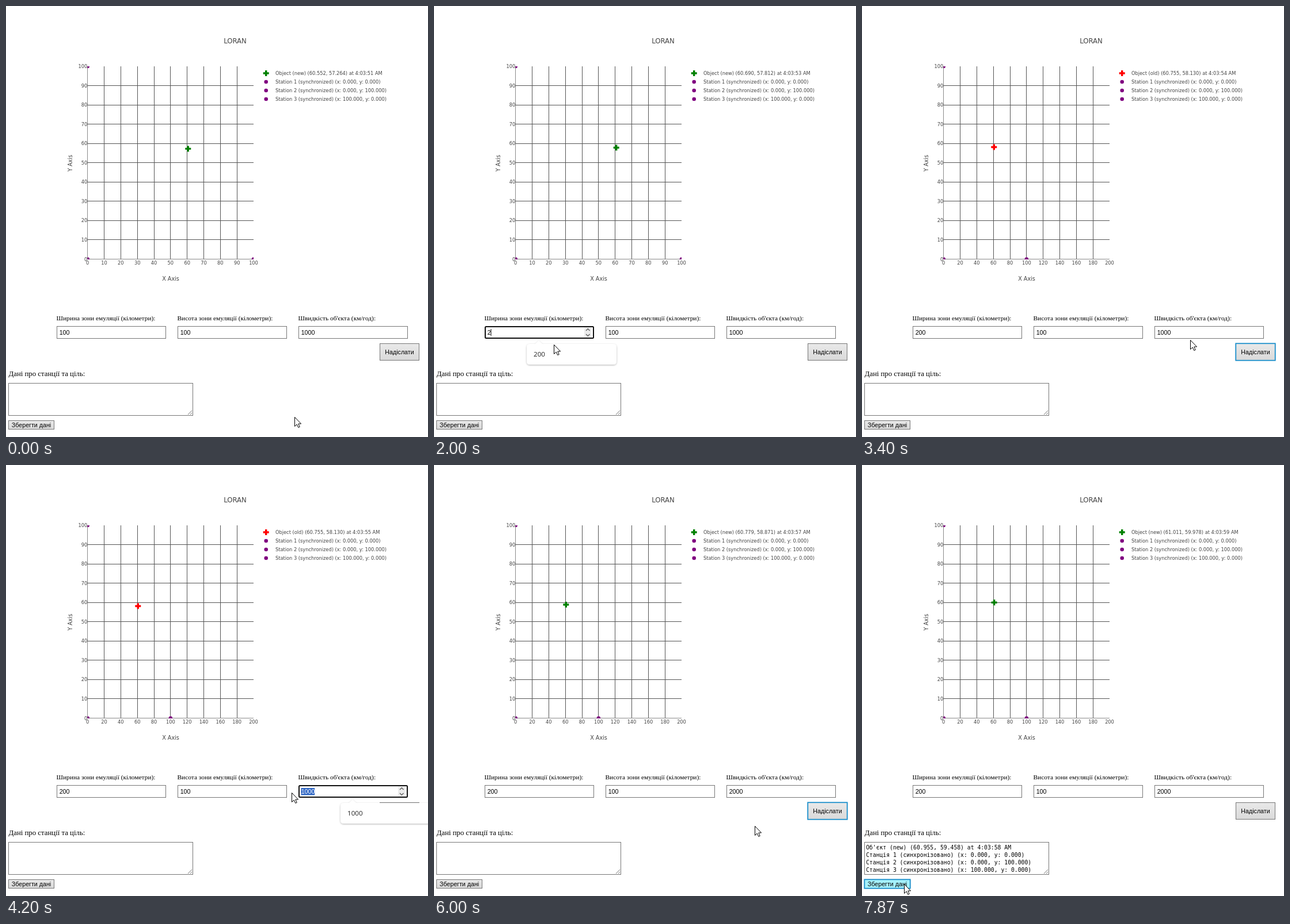
These frames come from a looping animation (733x750 px, 8000 ms). An HTML page:

```html
<!DOCTYPE html>
<html lang="uk">
<head>
<meta charset="utf-8">
<title>LORAN</title>
<style>
html, body { margin: 0; width: 100%; height: 100%; overflow: hidden; background: #fff; }
svg { display: block; width: 100%; height: 100%; }
text { white-space: pre; }
.plot { font: 8.25px "DejaVu Sans", Verdana, sans-serif; fill: #444; }
.title { font-size: 11.69px; }
.axis { font-size: 9.63px; }
.label { font: 11.4px "Liberation Serif", "Times New Roman", serif; }
.big { font-size: 12.8px; }
.ui { font: 10.67px "Liberation Sans", Arial, sans-serif; }
.mono { font: 9.74px "DejaVu Sans Mono", monospace; }
.item { font: 11.6px "Open Sans", "Noto Sans", sans-serif; fill: #222; }
.mid { text-anchor: middle; }
.end { text-anchor: end; }
.box { fill: #fff; stroke: #767676; }
.station { fill: #800080; }
.chev { fill: none; stroke: #666; stroke-width: 1.5; }
</style>
</head>
<body>
<svg id="stage" viewBox="0 0 733 750">
  <defs>
    <clipPath id="area"><rect x="141.5" y="105" width="288.5" height="336"/></clipPath>
    <linearGradient id="face" x2="0" y2="1">
      <stop stop-color="#e9e9e9"/><stop offset="1" stop-color="#d9d9d9"/>
    </linearGradient>
    <filter id="shadow" x="-10%" y="-20%" width="120%" height="150%">
      <feDropShadow dx="0" dy="1" stdDeviation="1.6" flood-opacity=".3"/>
    </filter>
  </defs>
</svg>
<script>
const LOOP = 8000;
const stage = document.getElementById('stage');

function add(parent, tag, attrs = {}, text) {
  const el = document.createElementNS('http://www.w3.org/2000/svg', tag);
  for (const k in attrs) el.setAttribute(k, attrs[k]);
  if (text !== undefined) el.textContent = text;
  parent.appendChild(el);
  return el;
}
const label = (parent, cls, x, y, text) => add(parent, 'text', { class: cls, x, y }, text);
const set = (el, attrs) => { for (const k in attrs) el.setAttribute(k, attrs[k]); };
const show = (el, on) => { el.style.display = on ? '' : 'none'; };
const write = (el, s) => { if (el.textContent !== s) el.textContent = s; };

// ---- chart ----
const CROSS = 'M-5-1.7H-1.7V-5H1.7V-1.7H5V1.7H1.7V5H-1.7V1.7H-5Z';
const px = v => 141.7 + v * 288.3;
const py = v => 440.5 - v * 3.355;
const chart = add(stage, 'g');
label(chart, 'plot title mid', 398, 65, 'LORAN');
label(chart, 'plot axis mid', 286, 478, 'X Axis');
add(chart, 'text', { class: 'plot axis mid', transform: 'translate(115.3 273.5) rotate(-90)' }, 'Y Axis');

const xTicks = [];
for (let k = 0; k <= 10; k++) {
  const x = Math.floor(px(k / 10)) + .5, y = Math.floor(py(k * 10)) + .5;
  const stroke = k ? '#555' : '#8a8a8a';
  if (k < 10) {
    add(chart, 'path', { d: `M${x} 105V440`, stroke });
    add(chart, 'path', { d: `M142 ${y}H430`, stroke });
  }
  label(chart, 'plot end', 141.3, py(k * 10) + 3, k * 10);
  xTicks.push(label(chart, 'plot mid', px(k / 10), 450, ''));
}
const area = add(chart, 'g', { 'clip-path': 'url(#area)' });
const dot = (parent, cx, cy) => add(parent, 'circle', { class: 'station', cx, cy, r: 3.3 });
dot(area, px(0), py(0));
dot(area, px(0), py(100));
const farDot = dot(area, px(1), py(0));
const target = add(area, 'path', { d: CROSS });

const keyMark = add(chart, 'path', { d: CROSS, transform: 'translate(451.7 117)' });
const keyText = label(chart, 'plot', 468, 120, '');
['x: 0.000, y: 0.000', 'x: 0.000, y: 100.000', 'x: 100.000, y: 0.000'].forEach((s, i) => {
  dot(chart, 451.7, 132 + 15 * i);
  label(chart, 'plot', 468, 135 + 15 * i, `Station ${i + 1} (synchronized) (${s})`);
});

// ---- form ----
function field(x, caption) {
  const g = add(stage, 'g');
  label(g, 'label', x - .5, 547, caption);
  const rect = add(g, 'rect', { class: 'box' });
  const spin = add(g, 'g');
  add(spin, 'rect', { x: x + 173, y: 559.5, width: 12.5, height: 17, fill: '#ececec' });
  add(spin, 'path', { class: 'chev', d: `M${x + 176} 565l3.3-3.3 3.3 3.3M${x + 176} 571l3.3 3.3 3.3-3.3` });
  const mark = add(g, 'rect', { x: x + 4.5, y: 562, height: 12.5, fill: '#2f66c4' });
  const text = label(g, 'ui', x + 4.7, 572, '');
  const caret = add(g, 'rect', { y: 562, width: 1, height: 12 });
  return (value, focus, selected, caretOn) => {
    const w = value.length * 5.93;
    const o = focus ? 1 : .5;
    set(rect, { x: x + o, y: 557 + o, width: 190 - 2 * o, height: 22 - 2 * o, rx: focus ? 1.5 : 0 });
    rect.style.stroke = focus ? '#101010' : '';
    rect.style.strokeWidth = focus ? 2 : 1;
    show(spin, focus);
    show(mark, selected);
    show(caret, caretOn);
    set(mark, { width: w });
    set(caret, { x: Math.round(x + 4.7 + w) - .5 });
    set(text, { fill: selected ? '#fff' : '#000' });
    write(text, value);
  };
}
const width = field(88, 'Ширина зони емуляції (кілометри):');
const height = field(298, 'Висота зони емуляції (кілометри):');
const speed = field(508, "Швидкість об'єкта (км/год):");

function button(x, y, w, h, base, caption) {
  const g = add(stage, 'g');
  const rect = add(g, 'rect');
  label(g, 'ui mid', x + w / 2, base, caption);
  return (hover, focus) => {
    const o = focus ? .25 : .5;
    set(rect, {
      x: x + o, y: y + o, width: w - 2 * o, height: h - 2 * o,
      fill: hover ? '#a5f1fb' : 'url(#face)',
      stroke: focus ? '#1b8fcb' : '#767676', 'stroke-width': focus ? 1.8 : 1
    });
  };
}
const send = button(649, 587, 69, 30, 606, 'Надіслати');

label(stage, 'label big', 4.5, 644, 'Дані про станції та ціль:');
add(stage, 'rect', { class: 'box', x: 4.5, y: 656.5, width: 320, height: 56 });
add(stage, 'path', { d: 'M316 711l7-7M320 711l3-3', stroke: '#777' });
const output = add(stage, 'g');
["Об'єкт (new) (60.955, 59.458) at 4:03:58 AM",
 'Станція 1 (синхронізовано) (x: 0.000, y: 0.000)',
 'Станція 2 (синхронізовано) (x: 0.000, y: 100.000)',
 'Станція 3 (синхронізовано) (x: 100.000, y: 0.000)'
].forEach((s, i) => label(output, 'mono', 7, 669 + 13 * i, s));
const save = button(4, 721, 80, 16, 733, 'Зберегти дані');

// ---- suggestion list ----
function popup(x, items) {
  const g = add(stage, 'g');
  const h = 36 * items.length;
  add(g, 'path', {
    d: `M${x + 6} 588H${x + 15}L${x + 21} 582.5L${x + 27} 588H${x + 150}q6 0 6 6V${582 + h}q0 6-6 6H${x + 6}q-6 0-6-6V594q0-6 6-6Z`,
    fill: '#fff', filter: 'url(#shadow)'
  });
  items.forEach((s, i) => label(g, 'item', x + 12, 610 + 36 * i, s));
  const close = add(g, 'path', { d: `M${x + 134} 602l8 8m0-8l-8 8`, stroke: '#333', 'stroke-width': 1.5 });
  return (t, from, to, fade, hover) => {
    show(g, t >= from && t < to + fade);
    const out = fade ? Math.min(1, Math.max(0, (t - to) / fade)) : 0;
    const s = 1 - .05 * out, cx = x + 78, cy = 588 + h / 2;
    set(g, { opacity: 1 - out, transform: `translate(${cx} ${cy}) scale(${s}) translate(${-cx} ${-cy})` });
    show(close, hover);
  };
}
const listAll = popup(161, ['100', '1000']);
const listWidth = popup(161, ['200']);
const listOld = popup(581, ['1000']);
const listSpeed = popup(581, ['2000']);

// ---- pointer ----
const pointer = add(stage, 'path', {
  d: 'M.5.5V16.5L4.2 13L6.8 18.5L9.2 17.4L6.8 12H11.6Z', fill: '#fff', stroke: '#000', 'stroke-width': 1
});
const path = [
  [70, 501, 715], [730, 142, 568], [870, 142, 568], [1230, 54, 572], [1730, 54, 572],
  [2440, 526, 625], [2600, 526, 625], [2930, 676, 602], [3070, 676, 602], [3400, 570, 581],
  [3700, 545, 568], [3930, 545, 568], [4130, 496, 570], [4260, 496, 570], [4770, 664, 610],
  [4930, 664, 610], [5450, 680, 599], [5850, 680, 599], [6000, 557, 628], [6670, 60, 723],
  [7000, 66, 727], [7470, 74, 729], [7840, 74, 729], [7870, 73, 729]
];
function pointerAt(t) {
  const i = path.findIndex(p => p[0] > t);
  if (i === 0) return path[0].slice(1);
  if (i < 0) return path[path.length - 1].slice(1);
  const [t0, x0, y0] = path[i - 1], [t1, x1, y1] = path[i];
  const u = (t - t0) / (t1 - t0), e = u * u * (3 - 2 * u);
  return [x0 + (x1 - x0) * e, y0 + (y1 - y0) * e];
}

// ---- state over time ----
const fixes = [
  [60.552, 57.264], [60.632, 57.496], [60.69, 57.812], [60.755, 58.13], [60.755, 58.13],
  [60.811, 58.647], [60.779, 58.871], [60.955, 59.458], [61.011, 59.978]
];
const widthKeys = [[0, '100'], [1870, '2'], [2100, '20'], [2330, '200']];
const speedKeys = [[0, '1000'], [4270, '2'], [4470, '20'], [4670, '200'], [4960, '2000']];
const lastKey = (keys, t) => keys.filter(k => k[0] <= t).pop();
const within = (t, a, b) => t >= a && t < b;

function typed(draw, keys, t, from, to) {
  const [at, value] = lastKey(keys, t);
  const focus = within(t, from, to);
  const selected = focus && at === 0;
  draw(value, focus, selected, focus && !selected && (t - at) % 1000 < 500);
}

function render(t) {
  const n = Math.min(8, Math.floor((t + 610) / 1000));
  const [x, y] = fixes[n];
  const old = n === 4, range = n >= 4 ? 200 : 100;
  const color = old ? '#f00' : '#008000';
  const sec = 51 + Math.floor((t + 270) / 1000);
  set(target, { transform: `translate(${px(x / range)} ${py(y)})`, fill: color });
  set(keyMark, { fill: color });
  set(farDot, { cx: px(100 / range) });
  write(keyText, `Object (${old ? 'old' : 'new'}) (${x.toFixed(3)}, ${y.toFixed(3)}) at 4:03:${sec} AM`);
  xTicks.forEach((el, k) => write(el, String(k * range / 10)));

  typed(width, widthKeys, t, 900, 3060);
  height('100', false, false, false);
  typed(speed, speedKeys, t, 3930, 5660);

  listAll(t, 930, 1870, 0, false);
  listWidth(t, 1870, 2400, 100, false);
  listOld(t, 3960, 4270, 0, false);
  listSpeed(t, 4270, 4980, 100, t > 4560);

  const [mx, my] = pointerAt(t);
  const over = (x0, y0, w, h) => mx >= x0 && mx < x0 + w && my >= y0 && my < y0 + h;
  send(over(649, 587, 69, 30) && !within(t, 3930, 5080), within(t, 3060, 3930) || within(t, 5660, 7000));
  save(over(4, 721, 80, 16), t >= 7000);
  show(output, t >= 7000);
  set(pointer, { transform: `translate(${Math.round(mx)} ${Math.round(my)})` });
}

const start = performance.now();
function tick(now) {
  render(Math.max(0, now - start) % LOOP);
  requestAnimationFrame(tick);
}
render(0);
requestAnimationFrame(tick);
</script>
</body>
</html>
```
